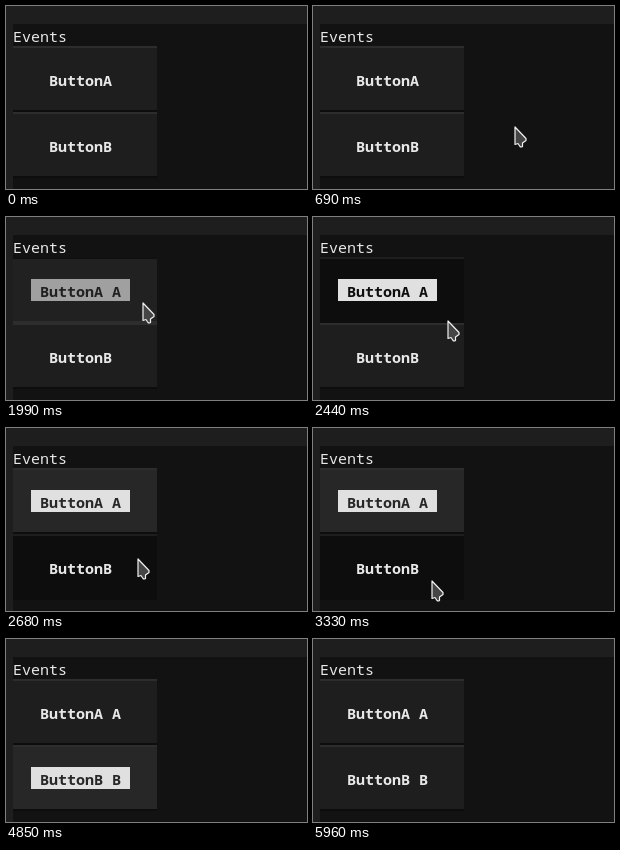
These frames come from a looping animation (301 px wide and 183 px high, 6000 ms). An HTML page with a canvas:

```html
<!DOCTYPE html>
<html lang="en">
<head>
<meta charset="utf-8">
<title>Events</title>
<style>
html, body { margin: 0; width: 100%; height: 100%; overflow: hidden; background: #1e1e1e; }
canvas { display: block; }
</style>
</head>
<body>
<canvas id="stage" width="301" height="183"></canvas>
<script>
const ctx = document.getElementById('stage').getContext('2d');
const LOOP = 6000, CELL = 9, ROW = 22, LEFT = 7;
const COLUMNS = 16, WIDTH = COLUMNS * CELL, HEIGHT = 3 * ROW, EDGE = 2;
const INK = '#e8e8e8', HIGHLIGHT = '#e0e0e0';

// Pointer stops: time, x, y
const path = [
  [330, 287, 176], [620, 213, 128], [930, 159, 95], [1090, 136, 85],
  [2240, 136, 85], [2440, 134, 103], [2680, 131, 130], [2800, 131, 157],
  [2840, 131, 158], [3010, 131, 158], [3330, 118, 152],
  [4730, 118, 152], [4810, 140, 158], [4850, 160, 162]
];

const buttons = [
  { name: 'A', y: 40, focus: 1870, relabel: 1910, active: 1910, release: 2200, blur: 3580 },
  { name: 'B', y: 106, focus: 3580, relabel: 3620, active: 3620, release: 3700, blur: 5960 }
];

const within = (t, from, to) => t >= from && t < to;

function rect(color, x, y, w, h) {
  ctx.fillStyle = color;
  ctx.fillRect(x, y, w, h);
}

function text(str, x, rowTop, color, weight) {
  ctx.font = `${weight} 15px "Noto Sans Mono", monospace`;
  ctx.fillStyle = color;
  ctx.fillText(str, x, rowTop + 18);
}

function pointerAt(t) {
  const i = path.findIndex(stop => t < stop[0]);
  if (i < 1) return null;
  const [t0, x0, y0] = path[i - 1], [t1, x1, y1] = path[i];
  const k = (t - t0) / (t1 - t0);
  return { x: Math.round(x0 + (x1 - x0) * k), y: Math.round(y0 + (y1 - y0) * k) };
}

function drawButton(b, t, pointer) {
  const hover = pointer && pointer.x < LEFT + WIDTH && within(pointer.y, b.y, b.y + HEIGHT);
  const focused = within(t, b.focus, b.blur);
  const active = within(t, b.active, b.release);
  let fill = '#1e1e1e', top = '#2d2d2d', bottom = '#0d0d0d';
  if (active) [fill, top, bottom] = ['#212121', '#101010', '#2d2d2d'];
  else if (hover) [fill, top] = ['#0d0d0d', '#1e1e1e'];
  else if (focused) fill = '#272727';

  rect(fill, LEFT, b.y, WIDTH, HEIGHT);
  rect(top, LEFT, b.y, WIDTH, EDGE);
  rect(bottom, LEFT, b.y + HEIGHT - EDGE, WIDTH, EDGE);

  // Labels are centred on whole character cells
  const label = 'Button' + b.name + (t >= b.relabel ? ' ' + b.name : '');
  const x = LEFT + Math.floor((COLUMNS - label.length) / 2) * CELL;
  const y = b.y + ROW;
  if (focused) rect(active ? '#a0a0a0' : HIGHLIGHT, x - CELL, y, (label.length + 2) * CELL, ROW);
  text(label, x, y, focused ? fill : INK, 'bold');
}

const arrow = new Path2D('M1 1V18.5L4 17.5L6 20.5Q7 21.5 8.5 20.5L8.5 17L12 14.5V12.5Z');

function drawPointer({ x, y }) {
  ctx.save();
  ctx.translate(x, y);
  ctx.fillStyle = '#454545';
  ctx.strokeStyle = '#f0f0f0';
  ctx.lineWidth = 1.2;
  ctx.lineJoin = 'round';
  ctx.fill(arrow);
  ctx.stroke(arrow);
  ctx.restore();
}

function draw(now) {
  const t = now % LOOP;
  const pointer = pointerAt(t);
  rect('#1e1e1e', 0, 0, 301, 183);
  rect('#121212', LEFT, 18, 294, 165);
  text('Events', LEFT, 18, INK, 500);
  buttons.forEach(b => drawButton(b, t, pointer));
  if (pointer) drawPointer(pointer);
}

const start = performance.now();
function tick() {
  draw(performance.now() - start);
  requestAnimationFrame(tick);
}
tick();
</script>
</body>
</html>
```
